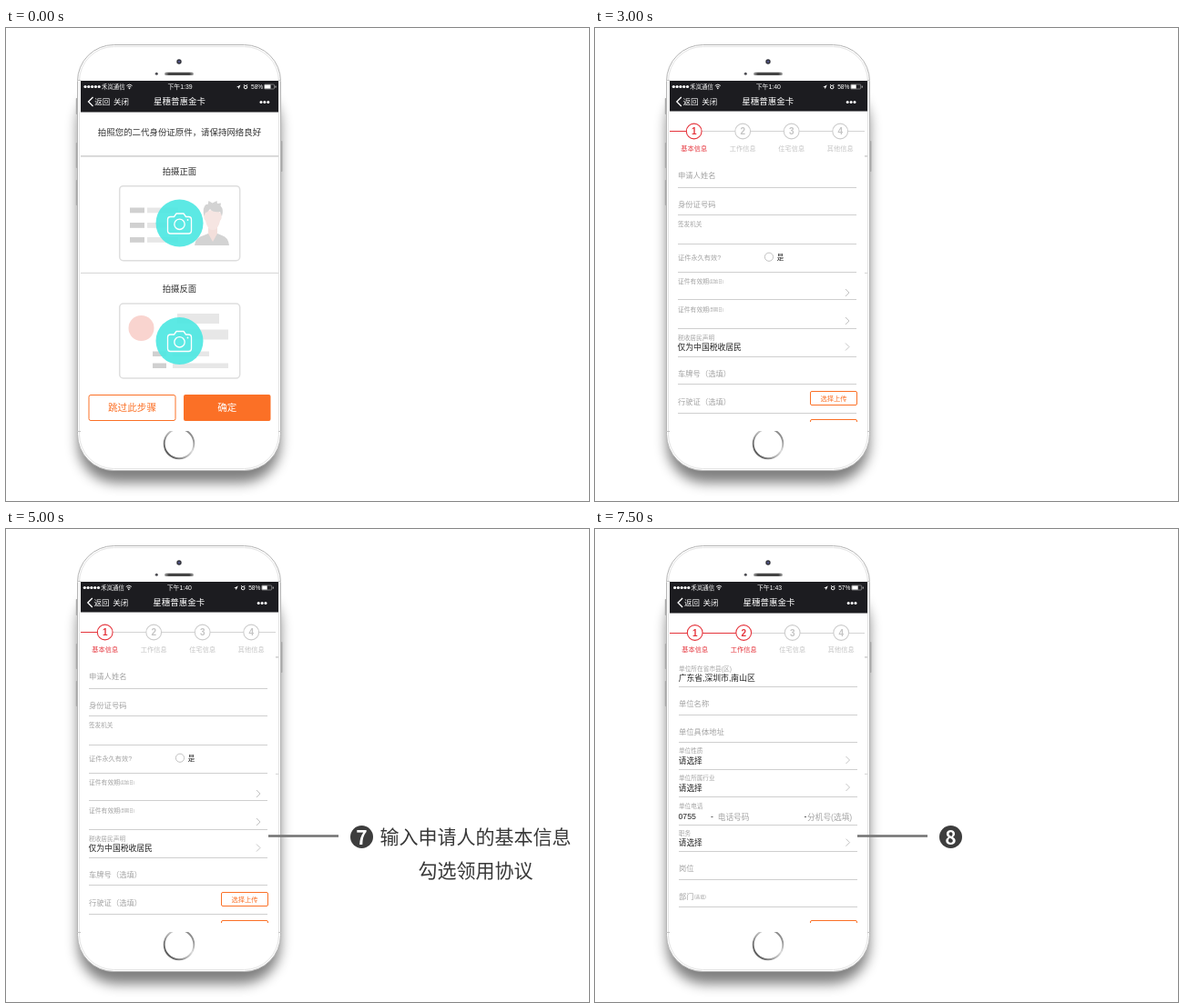
An HTML page that plays this animation: 640 by 520 pixels, repeating every 8000 ms.

```html
<!DOCTYPE html>
<html lang="zh-CN">
<head>
<meta charset="utf-8">
<title>Card application steps</title>
<style>
  html, body { margin: 0; width: 100%; height: 100%; overflow: hidden; background: #fff; }
  svg { display: block; }
  text { font-family: "Liberation Sans", "Noto Sans CJK SC", "Noto Sans CJK", sans-serif; white-space: pre; }
  .digit text { font-family: "Noto Sans CJK SC", "Noto Sans CJK", sans-serif; }
</style>
</head>
<body>
<svg id="stage" width="640" height="520" viewBox="0 0 640 520">
  <defs>
    <linearGradient id="ring" x1="0" y1="1" x2="1" y2="0.2">
      <stop offset="0" stop-color="#333"/><stop offset=".45" stop-color="#aaa"/>
      <stop offset=".7" stop-color="#ddd"/><stop offset="1" stop-color="#777"/>
    </linearGradient>
    <linearGradient id="speaker">
      <stop offset="0" stop-color="#aaa"/><stop offset=".15" stop-color="#444"/>
      <stop offset=".85" stop-color="#444"/><stop offset="1" stop-color="#aaa"/>
    </linearGradient>
    <filter id="soft" x="-20%" y="-20%" width="140%" height="140%"><feGaussianBlur stdDeviation="7"/></filter>
    <clipPath id="screen"><rect x="82" y="58" width="217" height="375"/></clipPath>
  </defs>
  <g id="phone"></g>
  <g id="pages" clip-path="url(#screen)"></g>
  <g id="notes"></g>
</svg>
<script>
const RED = '#e5343c', ORANGE = '#fb7026', DARK = '#222', GREY = '#a3a3a3', PALE = '#c4c4c4';

// Text placed by its left, middle or right edge and its vertical centre.
const text = (x, cy, size, str, fill = GREY, anchor = 'start', weight = 400) =>
  `<text x="${x}" y="${cy + size * .375}" font-size="${size}" fill="${fill}" text-anchor="${anchor}" font-weight="${weight}">${str}</text>`;
const rect = (x, y, w, h, fill, more = '') =>
  `<rect x="${x}" y="${y}" width="${w}" height="${h}" fill="${fill}" ${more}/>`;
const circle = (x, y, r, fill, more = '') =>
  `<circle cx="${x}" cy="${y}" r="${r}" fill="${fill}" ${more}/>`;
const path = (d, stroke, width = 1, more = '') =>
  `<path d="${d}" fill="none" stroke="${stroke}" stroke-width="${width}" ${more}/>`;
const outline = (x, y, w, h, color, r = 2, width = 1) =>
  rect(x, y, w, h, '#fff', `rx="${r}" stroke="${color}" stroke-width="${width}"`);
const rule = (x, y) => rect(x, Math.floor(y), 196, 1, '#cfcfcf');
const chevron = (x, y) => path(`M${x - 2} ${y - 4}l4 4l-4 4`, '#bbb', .9);

function phone() {
  const key = (x, y, h) => rect(x, y, 1.6, h, '#a8a8a8', 'rx=".8"');
  return rect(79, 64, 222, 436, '#000', 'rx="42" opacity=".5" filter="url(#soft)"')
    + key(76.8, 77, 18) + key(76.8, 126, 28) + key(76.8, 167, 28) + key(301.8, 124, 34)
    + outline(78.5, 18.5, 223, 468, '#b4b4b4', 40, 1)
    + outline(80.5, 20.5, 219, 464, '#e4e4e4', 38, 1)
    + path('M78 443.5h4M299 443.5h3M78 57.5h4M299 57.5h3', '#c4c4c4', 1)
    + circle(190, 37, 2.7, '#33343c') + circle(190, 37, 1.2, '#52568a')
    + circle(165.3, 50.3, 1.5, '#4a4a50')
    + rect(174, 48.8, 32, 3.2, 'url(#speaker)', 'rx="1.6"')
    + circle(190, 457, 16.3, '#fff', 'stroke="url(#ring)" stroke-width="1.9"')
    + rect(82, 433, 217, 10, '#fff');
}

function header(dx, dots, time, charge, level, bottom) {
  let s = rect(82, 58, 217, bottom - 58, '#1c1c20');
  for (let i = 0; i < 5; i++) s += circle(87 + dx + i * 3.8, 64.5, 1.6, '#fff');
  const x = 135.5 + dx;
  s += text(105 + dx, 64.5, 6.4, '禾岚通信', '#fff')
    + path(`M${x - 3} 63.4q3-2.6 6 0M${x - 1.8} 65q1.8-1.6 3.6 0`, '#fff', .9) + circle(x, 66.4, .8, '#fff')
    + text(191 + dx, 64.5, 6.9, time, '#fff', 'middle')
    + `<path d="M${253 + dots} 65l4.5-2.6l-2 4.8l-.5-2z" fill="#fff"/>`
    + circle(263 + dots, 65, 1.8, 'none', 'stroke="#fff" stroke-width="1"')
    + path(`M${260.8 + dots} 63l1-1M${265.2 + dots} 63l-1-1`, '#fff', .8)
    + text(269 + dots, 64.8, 6.6, charge, '#fff')
    + rect(283.5 + dots, 62, 11, 5, 'none', 'rx=".8" stroke="#aaa" stroke-width=".6"')
    + rect(284 + dots, 62.4, level, 4.2, '#fff') + rect(295.5 + dots, 63.6, 1, 2, '#ccc')
    + path(`M${95.5 + dx} 76l-5 5l5 5`, '#fff', 1.3)
    + text(97.3 + dx, 81.3, 8.5, '返回', '#fff') + text(118 + dx, 81.3, 8.5, '关闭', '#fff')
    + text(190.5 + dx, 80.8, 9.5, '星穗普惠金卡', '#fff', 'middle', 500);
  for (let i = 0; i < 3; i++) s += circle(280 + dots + i * 3.9, 81.5, 1.5, '#fff');
  return s;
}

function camera(x, y) {
  return circle(x, y, 26, '#50e8e2', 'opacity=".93"')
    + path(`M${x - 10} ${y - 7}h4l2.5-3.5h8l2.5 3.5h3q3 0 3 3v12.5q0 3-3 3h-20q-3 0-3-3v-12.5q0-3 3-3z`, '#fff', 1.3, 'stroke-linejoin="round"')
    + circle(x, y + 1.3, 5.7, 'none', 'stroke="#fff" stroke-width="1.3"')
    + circle(x + 9, y - 3.5, .9, '#fff');
}

function photoPage() {
  const mid = '#d0d0d0', light = '#e7e7e7';
  let s = header(0, 0, '下午1:39', '58%', 6.5, 92.5)
    + text(190.5, 114, 9.45, '拍照您的二代身份证原件，请保持网络良好', '#333', 'middle')
    + text(190.5, 157, 9.4, '拍摄正面', '#333', 'middle')
    + text(190.5, 286, 9.4, '拍摄反面', '#333', 'middle')
    + outline(124.7, 173.7, 132, 82, '#dedede', 4, 1.5)
    + outline(124.7, 303, 132, 82, '#dedede', 4, 1.5);
  for (const y of [197.5, 214, 230])
    s += rect(136, y, 16, 5.8, mid) + rect(155, y, 34, 5.8, light);
  s += '<path d="M207 239q1-9 10-11l6-2.5h8l6 2.5q7 2 8 11z" fill="#d3d3d3"/>'
    + '<path d="M222 219h10v7l-5 9l-5-9z" fill="#f3dfdb"/>'
    + '<path d="M217.5 204q9-8 19 0q1 5-1.5 8q-2 10-8 10q-6 0-8-10q-2.5-3-1.5-8z" fill="#f6e5e2"/>'
    + '<path d="M217.5 207q-2.5-9 2-13l2 0l1-4l4 2.5l5-2.5l.5 3l4-.5l-.5 3q4 4 1.5 11.5l-2-5q-8 1-11-3q-3 4-5 4z" fill="#d3d3d3"/>'
    + circle(148.5, 330, 14, '#f9d4cf')
    + rect(188, 314, 46, 11, light) + rect(188, 331.5, 56, 11, light)
    + rect(161, 355.5, 15, 5.5, mid) + rect(183, 355.5, 40, 5.5, light)
    + rect(161, 368.5, 15, 5.5, mid) + rect(183, 368.5, 61, 5.5, light)
    + camera(190.5, 214.5) + camera(190.5, 344)
    + outline(91, 403.5, 95, 28, ORANGE)
    + text(138.5, 417.5, 10.6, '跳过此步骤', ORANGE, 'middle')
    + rect(195, 403, 95.5, 29, ORANGE, 'rx="2"')
    + text(242.8, 417.5, 10.5, '确定', '#fff', 'middle', 500);
  return s;
}

function steps(x0, y, done) {
  const gap = 53.5, reached = x0 + gap * (done - 1);
  const top = Math.floor(y);
  let s = rect(82, top, 214, 1, '#d4d4d4') + rect(82, top, reached - 82, 1, RED);
  ['基本信息', '工作信息', '住宅信息', '其他信息'].forEach((name, i) => {
    const x = x0 + gap * i, on = i < done;
    s += circle(x, y, 8.4, '#fff', `stroke="${on ? RED : '#ccc'}" stroke-width="1.1"`)
      + text(x, y, 10, i + 1, on ? RED : PALE, 'middle', 700)
      + text(x, y + 18.7, 7.2, name, on ? RED : PALE, 'middle', on ? 500 : 400);
  });
  return s;
}

function basicPage() {
  let s = rect(82, 91, 214, 342, '#fff') + header(-.7, -2.8, '下午1:40', '58%', 5.5, 91.5) + steps(108.7, 113.5, 1);
  for (const y of [175, 205.5, 237, 268, 298.5, 330, 361, 391.5, 423]) s += rule(91, y);
  for (const y of [291, 322, 350.5]) s += chevron(277, y);
  return s
    + text(91, 162, 8.3, '申请人姓名') + text(91, 194, 8.3, '身份证号码')
    + text(91, 216, 6.6, '签发机关')
    + text(91, 252, 7.2, '证件永久有效?')
    + circle(191, 251.7, 4.6, '#fff', 'stroke="#bbb" stroke-width=".9"')
    + text(199.7, 252, 7.6, '是', DARK, 'start', 500)
    + text(91, 278, 6.8, '证件有效期') + text(125, 278.7, 4.4, '(起始日)')
    + text(91, 309, 6.8, '证件有效期') + text(125, 309.7, 4.4, '(到期日)')
    + text(91, 340, 6.7, '税收居民声明') + text(90.5, 351, 8.8, '仅为中国税收居民', DARK)
    + text(91, 380, 8.3, '车牌号（选填）') + text(91, 411, 8.3, '行驶证（选填）')
    + outline(236.5, 399.5, 51, 15, ORANGE, 1.5)
    + text(262, 407.3, 7.3, '选择上传', ORANGE, 'middle')
    + outline(236.5, 430.5, 51, 15, ORANGE, 1.5);
}

function workPage() {
  let s = rect(82, 92, 214, 341, '#fff') + header(.6, -1.8, '下午1:43', '57%', 6.5, 92.5) + steps(109.7, 114, 2);
  for (const y of [173.5, 204, 234, 264, 294, 325, 354.5, 385, 415]) s += rule(92, y);
  [['单位性质', 244], ['单位所属行业', 274], ['职务', 334.7]].forEach(([name, y]) =>
    s += text(92, y, 6.6, name) + text(91.7, y + 10.3, 8.7, '请选择', DARK) + chevron(277.5, y + 10));
  [['单位名称', 192], ['单位具体地址', 222.5], ['岗位', 373], ['部门', 403.5]].forEach(([name, y]) =>
    s += text(92, y, 8.3, name));
  return s
    + text(92, 153, 6.7, '单位所在省市县(区)')
    + text(91.7, 163.7, 8.8, '广东省,深圳市,南山区', DARK)
    + text(92, 304.5, 6.6, '单位电话')
    + text(91.5, 316, 8.7, '0755', DARK) + text(127, 316, 8.7, '-', DARK)
    + text(134.7, 316.8, 8.7, '电话号码')
    + text(229.5, 316, 8.7, '-', DARK) + text(233, 316.8, 8.7, '分机号(选填)')
    + text(108.7, 404, 5, '(选填)')
    + outline(236.5, 430.5, 51, 15, ORANGE, 1.5);
}

// The four parts of a callout, in the order they appear.
function note(x, digit, lines) {
  return [
    rect(x, 336.2, 77, 2.6, '#757575'),
    circle(x + 102.5, 338.5, 12.5, '#3d3d3d'),
    `<g class="digit">${text(x + 102.5, 339, 21, digit, '#fff', 'middle', 700)}</g>`,
    lines.map(([lx, ly, str]) => text(lx, ly, 21, str, '#383838')).join('')
  ];
}

const SCENE = 3000, LOOP = 8000, BEAT = 500;
const scenes = [
  { page: photoPage(), parts: note(299, 6, [[420.5, 337.3, '上传申请人的二代'], [420.5, 373.3, '身份证正反面照片']]) },
  { page: basicPage(), parts: note(288, 7, [[410.5, 338.2, '输入申请人的基本信息'], [452.5, 374.8, '勾选领用协议']]) },
  { page: workPage(), parts: note(288, 8, []) }
];

const byId = id => document.getElementById(id);
const group = s => `<g>${s}</g>`;
byId('phone').innerHTML = phone();
byId('pages').innerHTML = scenes.map(s => group(s.page)).join('');
byId('pages').insertAdjacentHTML('afterbegin',
  rect(82, 58, 217, 375, '#fff') + rect(82, 140, 217, 1.8, '#d6d6d6') + rect(82, 268.8, 217, 1.2, '#dadada'));
byId('notes').innerHTML = scenes.map(s => group(s.parts.map(group).join(''))).join('');

const pages = document.querySelectorAll('#pages > g');
const notes = document.querySelectorAll('#notes > g');
const show = (el, on) => el.style.display = on ? '' : 'none';
const start = performance.now();

function draw(now) {
  const t = Math.max(0, now - start) % LOOP;
  const current = Math.floor(t / SCENE), shown = Math.floor(t % SCENE / BEAT);
  pages.forEach((el, i) => show(el, i === current));
  notes.forEach((el, i) => {
    show(el, i === current);
    [...el.children].forEach((part, k) => show(part, k < shown));
  });
  requestAnimationFrame(draw);
}
draw(start);
</script>
</body>
</html>
```
